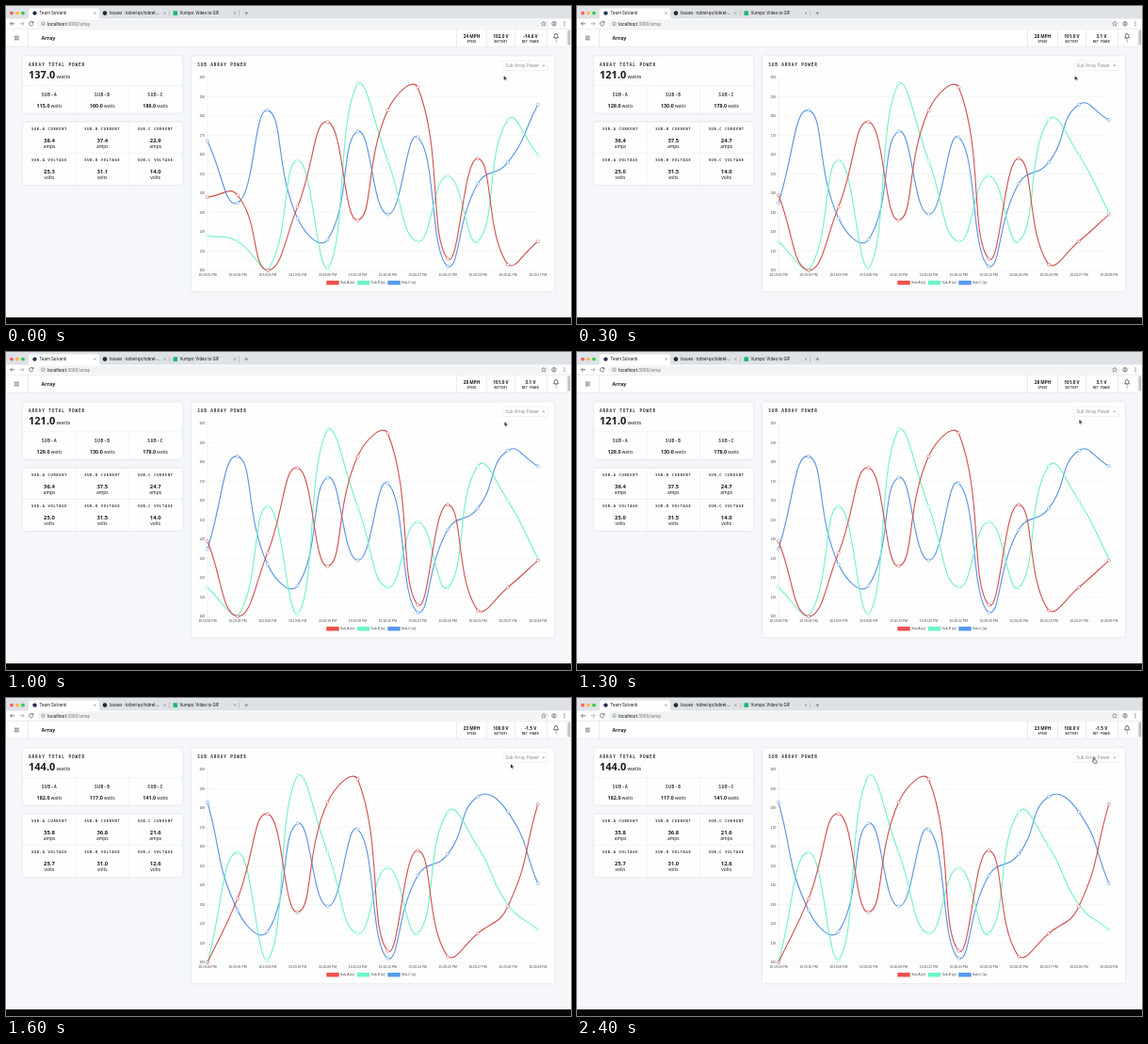
Write an HTML page that moves like this. It is 600 px wide and 338 px high and loops after 2.5 s.

```html
<!DOCTYPE html>
<html lang="en">
<head>
<meta charset="utf-8">
<title>Array dashboard</title>
<style>
html, body { margin: 0; width: 100%; height: 100%; overflow: hidden; background: #f5f7fa; }
svg { display: block; width: 100vw; height: 100vh; }
text { font-family: "Noto Sans", "Open Sans", sans-serif; fill: #1c1c1c; white-space: pre; }
.ui { font-family: Roboto, Arial, sans-serif; }
.chart { font-family: "Liberation Sans", Arial, sans-serif; fill: #444; }
.mono { font-family: "Noto Sans Mono", "DejaVu Sans Mono", monospace; font-weight: 600; fill: #333; }
.b { font-weight: 700; }
.card { fill: #fefefe; filter: drop-shadow(0 .5px .8px rgba(40, 50, 70, .16)); }
.rule { stroke: #edeff2; stroke-width: .7; fill: none; }
.icon { stroke: #5f6368; stroke-width: .8; fill: none; }
.state, .cursor path { visibility: hidden; }
.state, .cursor, .cursor path { animation: 2.5s step-end infinite; }
#s0 { animation-name: first; }
#s1 { animation-name: second; }
#s2 { animation-name: third; }
.cursor { animation-name: move; }
.cursor .arrow { animation-name: arrow; }
.cursor .hand { animation-name: hand; }
@keyframes first { 0% { visibility: visible } 12%, 100% { visibility: hidden } }
@keyframes second { 0% { visibility: hidden } 12% { visibility: visible } 64%, 100% { visibility: hidden } }
@keyframes third { 0% { visibility: hidden } 64%, 100% { visibility: visible } }
@keyframes arrow { 0% { visibility: visible } 96%, 100% { visibility: hidden } }
@keyframes hand { 0% { visibility: hidden } 96%, 100% { visibility: visible } }
@keyframes move {
  0% { transform: translate(528.6px, 74px) }
  40% { transform: translate(529.4px, 74px); animation-timing-function: steps(5) }
  60% { transform: translate(536px, 70px) }
  92% { transform: translate(543px, 67px) }
  96%, 100% { transform: translate(549px, 63.5px) }
}
</style>
</head>
<body>
<svg id="stage" viewBox="0 0 600 338" preserveAspectRatio="none"></svg>
<script>
const states = [
  { head: ['24 MPH', '102.0 V', '-14.6 V'], total: '137.0', amps: ['38.4', '37.4', '22.9'], volts: ['25.3', '31.1', '14.0'] },
  { head: ['28 MPH', '101.0 V', '3.1 V'], total: '121.0', amps: ['36.4', '37.5', '24.7'], volts: ['25.0', '31.5', '14.0'] },
  { head: ['23 MPH', '100.0 V', '-1.5 V'], total: '144.0', amps: ['35.8', '36.8', '21.6'], volts: ['25.7', '31.0', '12.6'] }
];
const series = [
  { name: 'A', line: '#cf4f4f', fill: '#ee504b', data: [138, 139, 100, 133, 177, 126, 183, 195, 106, 158, 103, 115, 129, 182] },
  { name: 'B', line: '#72f0c8', fill: '#6cf5c8', data: [118, 115, 100, 157, 101, 197, 157, 115, 149, 115, 178, 160, 130, 117] },
  { name: 'C', line: '#5594e0', fill: '#5599ee', data: [167, 135, 183, 127, 116, 172, 129, 169, 102, 145, 156, 186, 178, 141] }
];
const times = ['19:01', '19:02', '19:03', '19:05', '19:06', '20:19', '20:20', '20:22', '20:23', '20:24', '20:25', '20:27', '20:28', '20:29'];
const area = { left: 214, right: 564.8, top: 76, bottom: 281 };
const shown = 12;
const cols = [46, 102.3, 158.7];
const heads = [494.5, 525.5, 557];

const px = i => area.left + i * (area.right - area.left) / (shown - 1);
const py = v => area.bottom - (v - 100) * 2.05;
const clamp = (v, lo, hi) => Math.min(hi, Math.max(lo, v));

const text = (x, y, size, str, cls = '', anchor = 'start', extra = '') =>
  `<text x="${x}" y="${y}" font-size="${size}" class="${cls}" text-anchor="${anchor}" ${extra}>${str}</text>`;
const mid = (x, y, size, str, cls) => text(x, y, size, str, cls, 'middle');
const mono = (x, y, size, gap, str, anchor = 'start') =>
  text(x, y, size, str, 'mono', anchor, `letter-spacing="${gap}"`);
const rect = (x, y, w, h, fill, r = 0) =>
  `<rect x="${x}" y="${y}" width="${w}" height="${h}" rx="${r}" fill="${fill}"/>`;
const dot = (x, y, r, fill) => `<circle cx="${x}" cy="${y}" r="${r}" fill="${fill}"/>`;
const path = (d, cls, extra = '') => `<path d="${d}" class="${cls}" ${extra}/>`;
const card = (x, y, w, h) => `<rect class="card" x="${x}" y="${y}" width="${w}" height="${h}" rx="2"/>`;

// Cardinal spline with handles kept inside the plot area
function curve(pts, tension = 0.5) {
  const handles = pts.map((p, i) => {
    const a = pts[i - 1] || p, b = pts[i + 1] || p;
    const da = Math.hypot(p[0] - a[0], p[1] - a[1]);
    const db = Math.hypot(b[0] - p[0], b[1] - p[1]);
    const at = k => [
      clamp(p[0] + k * (b[0] - a[0]), area.left, area.right),
      clamp(p[1] + k * (b[1] - a[1]), area.top, area.bottom)
    ];
    return [at(-tension * da / (da + db)), at(tension * db / (da + db))];
  });
  return 'M' + pts[0] + pts.slice(1).map((p, i) => `C${handles[i][1]} ${handles[i + 1][0]} ${p}`).join('');
}

function browser() {
  const tab = (x, title) => text(x, 9.3, 4.6, title, 'ui');
  const close = x => path(`M${x - 1.1} 6.5l2.2 2.2m0-2.2l-2.2 2.2`, 'icon', 'style="stroke-width:.5"');
  return rect(0, 0, 600, 14, '#dee1e6') +
    path('M22 14q2 0 2-2V4.5q0-2 2-2H97q2 0 2 2V12q0 2 2 2z', '', 'fill="#fff"') +
    dot(6, 7.6, 1.9, '#fc5b57') + dot(12, 7.6, 1.9, '#fdbc40') + dot(18, 7.6, 1.9, '#34c84a') +
    dot(30.5, 7.6, 2.2, '#23324a') + tab(35.5, 'Team Solvanti') + close(94.5) +
    dot(105, 7.6, 2.3, '#24292e') + tab(110, 'Issues · tobrel-qx/tobrel-…') + close(168.5) +
    rect(177.5, 5.3, 4.6, 4.6, '#1bb76e') + tab(184.5, 'Vumpo: Video to GIF') + close(243) +
    path('M173.5 4.5v6.5M247.5 4.5v6.5', 'icon', 'style="stroke:#a5a8ad;stroke-width:.5"') +
    path('M253.5 7.6h3.6M255.3 5.8v3.6', 'icon', 'style="stroke-width:.6"') +
    rect(0, 13.5, 600, 11, '#fff') + rect(33, 14.5, 544, 8.6, '#f1f3f4', 4.3) +
    path('M9 18.8H4.5m2-2l-2 2 2 2', 'icon') +
    path('M14.5 18.8H19m-2-2l2 2-2 2', 'icon', 'opacity=".55"') +
    path('M28.7 17.6a2.2 2.2 0 1 0 .2 1.8M29 16v2h-2', 'icon') +
    '<circle cx="39.5" cy="18.8" r="1.8" class="icon" style="stroke-width:.5"/>' +
    path('M39.5 18.5v1.3', 'icon', 'style="stroke-width:.5"') +
    text(44, 20.6, 4.9, 'localhost<tspan fill="#777">:3000/array</tspan>', 'ui') +
    path('M571 16.3l.7 1.7 1.8.1-1.4 1.2.5 1.8-1.6-1-1.6 1 .5-1.8-1.4-1.2 1.8-.1z', 'icon', 'style="stroke-width:.5"') +
    '<circle cx="582" cy="18.8" r="2.3" class="icon" style="stroke-width:.7"/>' +
    dot(582, 18.1, .8, '#5f6368') + path('M580.6 20.3q1.4-1.2 2.8 0', 'icon') +
    [16.9, 18.8, 20.7].map(y => dot(593, y, .6, '#5f6368')).join('');
}

function layout() {
  const captions = ['SPEED', 'BATTERY', 'NET POWER'];
  const grid = Array.from({ length: 11 }, (_, i) => 200 - i * 10);
  return rect(0, 0, 600, 338, '#f5f7fa') + browser() +
    rect(0, 24.3, 600, 18.7, '#fff') +
    path('M0 24.3H600M0 43.2H595M23.5 24.5V43M478.5 24.5V43M510.5 24.5V43M540.5 24.5V43M574.5 24.5V43', 'rule', 'style="stroke:#e2e4e8"') +
    path('M8.8 32.2h5M8.8 34h5M8.8 35.8h5', 'icon', 'style="stroke:#444;stroke-width:.7"') +
    text(37.5, 36, 5.4, 'Array', 'b') +
    heads.map((x, i) => mono(x, 38.9, 2.9, .25, captions[i], 'middle')).join('') +
    path('M581.6 33.8q.8-.8.8-2.5a1.7 1.7 0 0 1 3.4 0q0 1.7.8 2.5zM583.5 34.8h1.2M584.1 29v.6', 'icon', 'style="stroke:#333;stroke-width:.7"') +
    mid(584, 39, 3, '1') +
    rect(595, 24.5, 5, 307, '#fafafa') + path('M595.2 24.5V331', 'rule') + rect(596.5, 25.5, 2.7, 16, '#c1c1c1', 1.3) +
    card(18, 53.3, 169, 60.4) + card(18, 123.5, 169, 66.5) + card(197, 53.3, 385, 249.9) +
    path('M18 84.8H187M74.3 84.8V113.5M130.6 84.8V113.5M18 156.5H187M74.3 123.7V190M130.6 123.7V190', 'rule') +
    mono(24, 63.6, 4.4, .9, 'ARRAY TOTAL POWER') +
    cols.map((x, i) => {
      const sub = 'SUB-' + 'ABC'[i];
      return mono(x, 95.6, 4.4, .7, sub, 'middle') +
        mono(x, 131.5, 3.7, .72, sub + ' CURRENT', 'middle') +
        mono(x, 164.7, 3.7, .72, sub + ' VOLTAGE', 'middle') +
        mid(x, 151.2, 4.9, 'amps') + mid(x, 184.2, 4.9, 'volts');
    }).join('') +
    mono(203.3, 63.6, 4.4, .87, 'SUB ARRAY POWER') +
    '<rect x="527.3" y="58.3" width="47.7" height="10.2" rx="1" fill="#fff" stroke="#e6e8ec" stroke-width=".6"/>' +
    text(530.5, 65.2, 4.6, 'Sub Array Power', '', 'start', 'style="fill:#868c94"') +
    path('M569.7 62.8h2.6l-1.3 1.5z', '', 'fill="#777"') +
    path(grid.map(v => `M211.5 ${py(v)}H${area.right}`).join(''), 'rule', 'style="stroke:#f1f1f2;stroke-width:.6"') +
    path(`M${area.left} 76V283.5`, 'rule', 'style="stroke:#ececed;stroke-width:.6"') +
    grid.map(v => text(211, py(v) + 1.2, 3.3, v, 'chart', 'end')).join('') +
    series.map((s, i) => rect(340.3 + i * 32.5, 291.9, 13.4, 4.5, s.fill) +
      text(355 + i * 32.5, 295.4, 3.4, `Sub-${s.name} (w)`, 'chart')).join('') +
    rect(0, 331, 600, 7, '#050505');
}

function state(s, n) {
  const lines = series.slice().reverse().map(({ line, data }) => {
    const pts = data.slice(n, n + shown).map((v, i) => [px(i), py(v)]);
    return path(curve(pts), '', `fill="none" stroke="${line}" stroke-width="1.1"`) +
      pts.map(([x, y]) => `<circle cx="${x}" cy="${y}" r="1.6" fill="#fff" stroke="${line}" stroke-width=".5"/>`).join('');
  }).join('');
  return `<g class="state" id="s${n}">` +
    heads.map((x, i) => mid(x, 34, 4.7, s.head[i], 'b')).join('') +
    text(24, 76.8, 11, `${s.total}<tspan font-size="5.8" font-weight="400" dx="1.2">watts</tspan>`, 'b') +
    cols.map((x, i) =>
      mid(x, 108, 5.4, `${series[i].data[n + shown - 1]}.0<tspan font-size="4.6" font-weight="400"> watts</tspan>`, 'b') +
      mid(x, 144.6, 5.9, s.amps[i], 'b') + mid(x, 177.6, 5.9, s.volts[i], 'b')).join('') +
    times.slice(n, n + shown).map((t, i) => mid(px(i), 287.3, 3.4, `10:${t} PM`, 'chart')).join('') +
    lines + '</g>';
}

const cursor = '<g class="cursor">' +
  path('M0 0V4.8L1.1 3.8 1.9 5.5 2.7 5.1 1.9 3.5H3.4Z', 'arrow', 'fill="#111" stroke="#fff" stroke-width=".3"') +
  path('M-.6 .3q.6-.6 1.2 0V2.2l2 .5q.7.2.5 1L2.6 5.7H-.1L-1.8 3.4q.2-.8 1.2 0Z', 'hand', 'fill="#fff" stroke="#111" stroke-width=".6"') +
  '</g>';

document.getElementById('stage').innerHTML = layout() + states.map(state).join('') + cursor;
</script>
</body>
</html>
```
